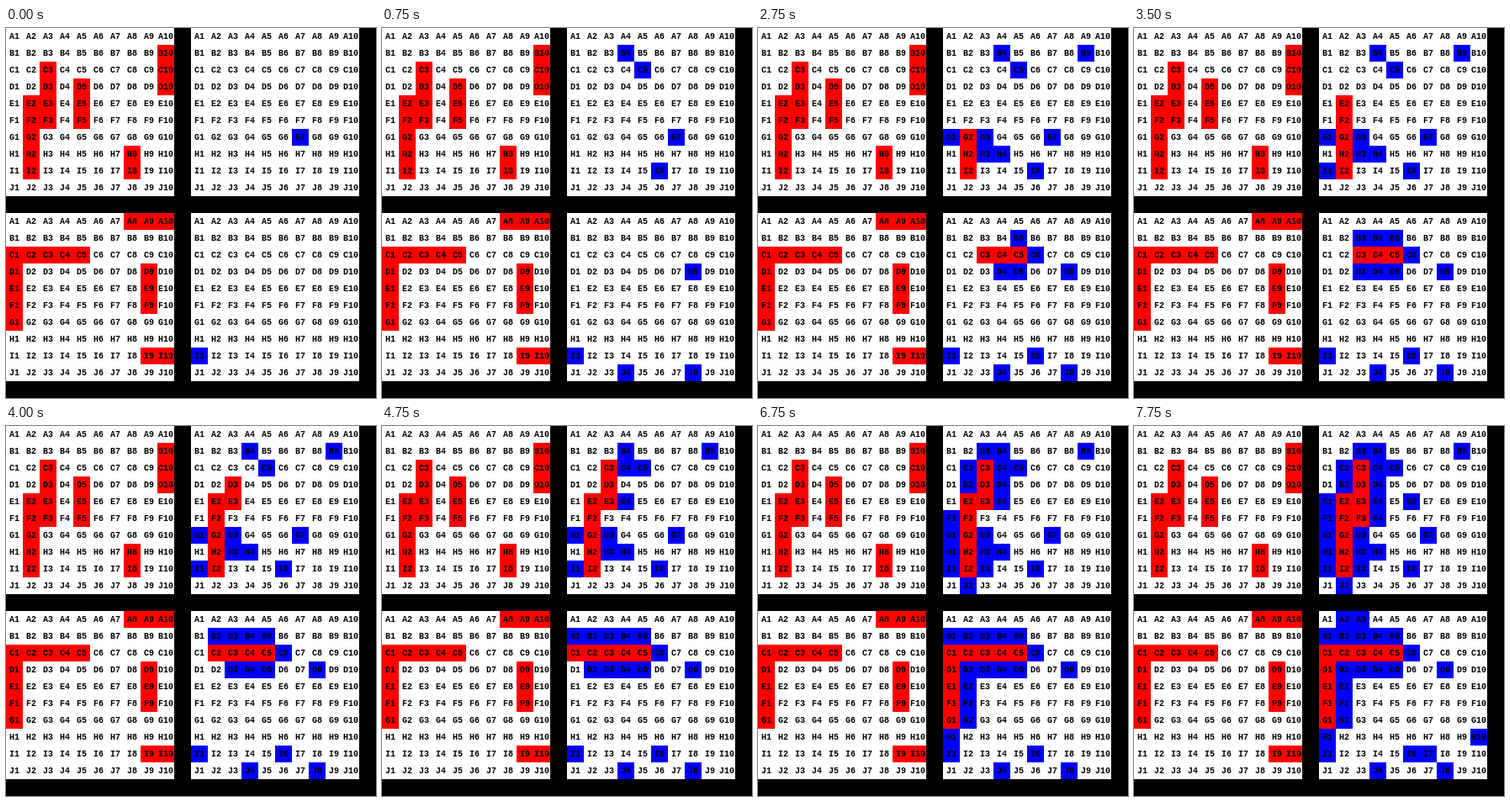
An HTML page for the animation above (8 s loop, 440 px wide and 440 px high).

```html
<!DOCTYPE html>
<html lang="en">
<head>
<meta charset="utf-8">
<title>Battleship duel</title>
<style>
html, body { margin: 0; width: 100%; height: 100%; overflow: hidden; background: #000; }
svg { display: block; width: 440px; height: 440px; }
rect { shape-rendering: crispEdges; }
text { font: bold 10px "Liberation Mono", "Courier New", monospace; text-anchor: middle; fill: #000; }
</style>
</head>
<body>
<svg id="stage" viewBox="0 0 440 440"></svg>
<script>
const NS = "http://www.w3.org/2000/svg";
const CELL = 20, SIZE = 10, STEP = 250, LOOP = 8000;
const stage = document.getElementById("stage");

// Each player: own fleet, and the shots fired at it in order.
const players = [
  {
    ships: "B10 C10 D10 C3 D3 E3 F3 E2 F2 G2 H2 I2 D5 E5 F5 H8 I8",
    shots: "G7 B4 I6 C5 B9 H4 G2 G3 H2 G1 H3 I2 F2 I1 E2 E3 " +
           "D3 E4 C3 C4 H1 J2 C2 F1 I3 B3 D2 D4 F3 F4 E1 E6"
  },
  {
    ships: "A8 A9 A10 C1 C2 C3 C4 C5 D1 E1 F1 G1 D9 E9 F9 I9 I10",
    shots: "I1 J8 D8 J4 I6 C5 C6 D5 C4 D4 C3 B5 B4 D3 B3 C2 " +
           "B2 C1 D2 B1 D1 E1 F1 E2 G1 F2 H1 G2 A3 A2 I7 H10"
  }
];

function add(tag, attrs) {
  const el = document.createElementNS(NS, tag);
  for (const key in attrs) el.setAttribute(key, attrs[key]);
  return stage.appendChild(el);
}

function makeGrid(left, top) {
  const cells = {};
  for (let r = 0; r < SIZE; r++) {
    for (let c = 0; c < SIZE; c++) {
      const name = "ABCDEFGHIJ"[r] + (c + 1);
      const x = left + c * CELL, y = top + r * CELL;
      cells[name] = add("rect", { x, y, width: CELL, height: CELL, fill: "#fff" });
      add("text", { x: x + CELL / 2, y: y + 13 }).textContent = name;
    }
  }
  return cells;
}

players.forEach((p, i) => {
  const top = i * 220;
  const fleet = makeGrid(0, top);
  p.ships = p.ships.split(" ");
  p.shots = p.shots.split(" ");
  p.ships.forEach(name => fleet[name].setAttribute("fill", "#f00"));
  p.target = makeGrid(220, top);
});

let shown = -1;

function render(time) {
  const turn = Math.floor((time % LOOP) / STEP);
  if (turn === shown) return;
  shown = turn;
  for (const p of players) {
    p.shots.forEach((name, i) => {
      const hit = p.ships.includes(name) ? "#f00" : "#00f";
      p.target[name].setAttribute("fill", i <= turn ? hit : "#fff");
    });
  }
}

const start = performance.now();

function tick() {
  render(performance.now() - start);
  requestAnimationFrame(tick);
}

tick();
</script>
</body>
</html>
```
